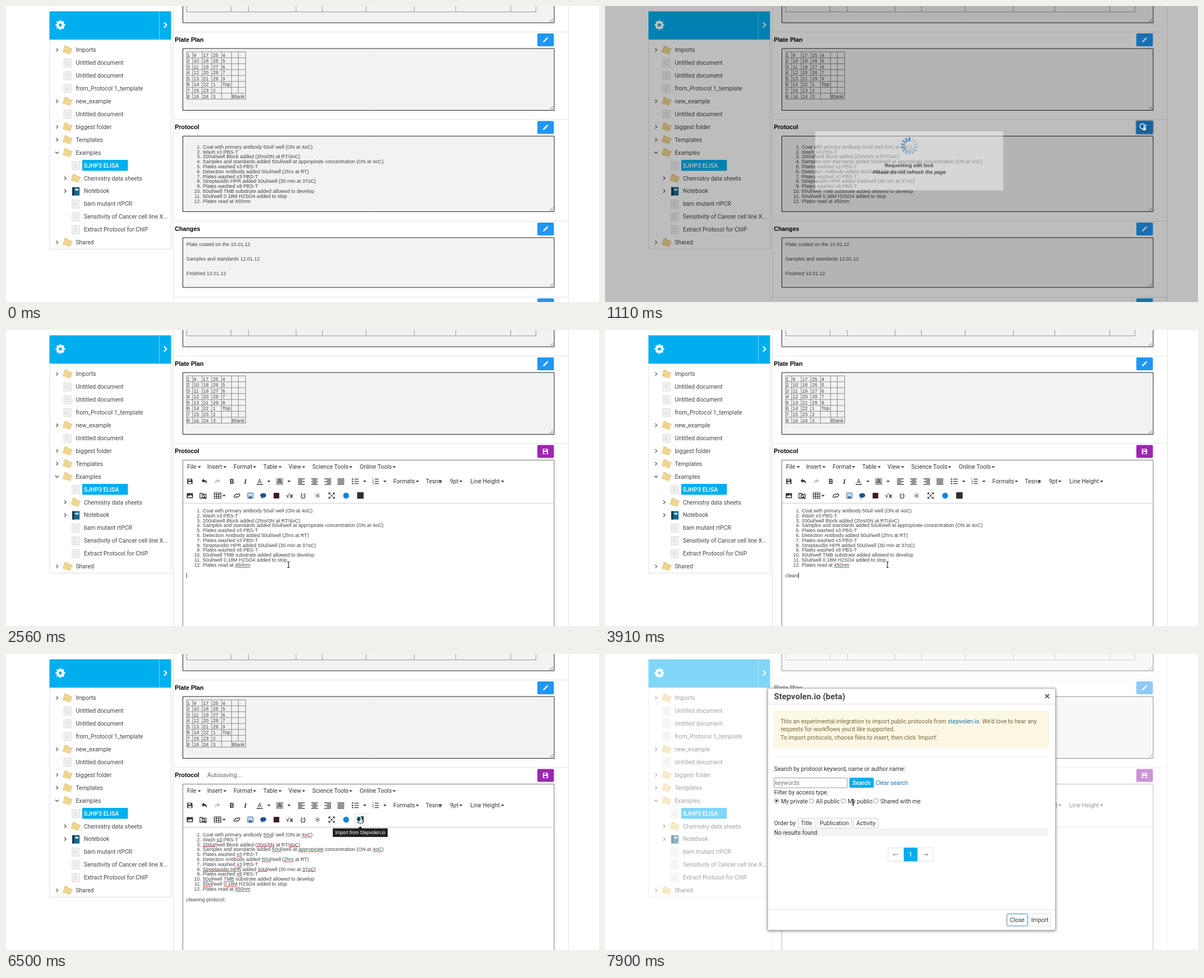
Recreate the animation shown at these times as an HTML page with a canvas. Size 1058 px wide and 529 px high, loop 7.99 s.

```html
<!DOCTYPE html>
<html lang="en">
<head>
<meta charset="utf-8">
<title>Lab notebook editing</title>
<style>
html, body { margin: 0; width: 100%; height: 100%; overflow: hidden; background: #fff; }
canvas { display: block; width: 100vw; height: 100vh; }
</style>
</head>
<body>
<canvas id="stage" width="1058" height="529"></canvas>
<script>
const c = document.getElementById('stage').getContext('2d');
const LOOP = 7990, UI = 'Roboto, sans-serif', DOC = '"Liberation Sans", sans-serif';
const BLUE = '#00aeef', INK = '#333', SITE = 'Stepvolen.io';

// ---- drawing helpers; text is centred vertically on y ----
function text(s, x, y, { size = 10.43, color = INK, style = '', face = UI, align = 'left' } = {}) {
  c.font = `${style} ${size}px ${face}`;
  c.fillStyle = color;
  c.textAlign = align;
  c.fillText(s, x, y + size * 0.36);
  return x + c.measureText(s).width;
}
const docText = (s, x, y, o) => text(s, x, y, { size: 8.94, face: DOC, color: '#444', ...o });
function box(x0, y0, x1, y1, fill, stroke, r = 0) {
  c.beginPath();
  c.roundRect(x0, y0, x1 - x0, y1 - y0, r);
  if (fill) { c.fillStyle = fill; c.fill(); }
  if (stroke) { c.strokeStyle = stroke; c.lineWidth = 1; c.stroke(); }
}
function line(x0, y0, x1, y1, color = '#ddd', w = 1) {
  c.beginPath(); c.moveTo(x0, y0); c.lineTo(x1, y1);
  c.strokeStyle = color; c.lineWidth = w; c.stroke();
}
function icon(d, x, y, { fill, stroke, w = 1.3, flip = 1 } = {}) {
  c.save();
  c.translate(x, y); c.scale(flip, 1);
  const p = new Path2D(d);
  if (fill) { c.fillStyle = fill; c.fill(p, 'evenodd'); }
  if (stroke) { c.strokeStyle = stroke; c.lineWidth = w; c.stroke(p); }
  c.restore();
}
const dot = (x, y, r, fill) => { c.beginPath(); c.arc(x, y, r, 0, 7); c.fillStyle = fill; c.fill(); };
const drop = (x, y) => icon('M-3-1.3H3L0 1.7Z', x, y, { fill: INK });

const PENCIL = 'M-4.5 4.5L-3.8 1.9 1.7-3.7 3.7-1.7-1.9 3.8ZM2.3-4.3L3.2-5.2 5.2-3.2 4.3-2.3Z';
const SAVE = 'M-4.7-4.7H3L4.7-3V4.7H-4.7ZM-2.8-3.8H1.6V-1.2H-2.8ZM-2.8 1H2.8V4H-2.8Z';
const UNDO = 'M-5-1L-1-5V-2.6C3-2.6 5 0 4 4.5 3 1.5 1 .6-1 .6V3Z';

// ---- sidebar ----
const TREE = [
  [1, 'folder', 'Imports'], [1, 'doc', 'Untitled document'], [1, 'doc', 'Untitled document'],
  [1, 'doc', 'from_Protocol 1_template'], [1, 'folder', 'new_example'], [1, 'doc', 'Untitled document'],
  [1, 'folder', 'biggest folder'], [1, 'folder', 'Templates'], [1, 'open', 'Examples'],
  [2, 'chosen', 'SJHP3 ELISA'], [2, 'folder', 'Chemistry data sheets'], [2, 'book', 'Notebook'],
  [2, 'doc', 'bam mutant rtPCR'], [2, 'doc', 'Sensitivity of Cancer cell line X...'],
  [2, 'doc', 'Extract Protocol for ChIP'], [1, 'folder', 'Shared']
];
function treeIcon(kind, x, y) {
  if (kind === 'folder' || kind === 'open') {
    icon('M-5-8L0-6.5 1-5 9-2.5 5 8-8.5 4Z', x, y, { fill: '#dfc078' });
    icon('M-5-6.5L8.5-2 4.5 8-9 3.5Z', x, y, { fill: '#efd592' });
  } else if (kind === 'book') {
    box(x - 6, y - 7, x + 7, y + 8, '#126a91');
    box(x - 6, y - 7, x - 3, y + 8, '#1d2f3a');
    box(x - 1, y - 4, x + 5, y - 1, '#d5e6ee');
  } else {
    box(x - 6.5, y - 7, x + 6.5, y + 7.5, '#f4f4f4', '#d6d6d6');
    for (const k of [-3, 0, 3]) line(x - 4, y + k, x + 3, y + k, '#d0d0d0');
  }
}
function sidebar() {
  box(78, 60, 294.5, 434.5, '#fff', '#ddd');
  box(77.5, 9.5, 294.5, 60, BLUE);
  line(273.5, 9.5, 273.5, 60, '#6fd0f5');
  c.save();
  c.translate(97, 34);
  for (let i = 0; i < 8; i++) {
    c.rotate(Math.PI / 4);
    box(-1.8, -8.4, 1.8, -4, '#fff');
  }
  c.restore();
  dot(97, 34, 6.7, '#fff');
  dot(97, 34, 2.8, BLUE);
  icon('M-2-4.5L2.5 0-2 4.5', 284, 34, { stroke: '#fff', w: 2 });
  TREE.forEach(([level, kind, label], i) => {
    const y = 78.6 + i * 22.92, dx = (level - 1) * 14.6;
    treeIcon(kind, 109.7 + dx, y);
    if (kind === 'open') icon('M-3-1.5L0 1.5 3-1.5', 91 + dx, y, { stroke: '#555' });
    else if (kind === 'folder' || kind === 'book') icon('M-1.5-3L1.5 0-1.5 3', 91 + dx, y, { stroke: '#555' });
    if (kind === 'chosen') box(136, 275, 217.5, 294.5, BLUE, null, 1.5);
    text(label, 124.4 + dx, y, kind === 'chosen' ? { color: '#fff', style: '500' } : { color: '#444' });
  });
}

// ---- document ----
const STEPS = [
  'Coat with primary antibody 50ul/ well (ON at 4oC)', 'Wash x3 PBS-T',
  '200ul/well Block added (2hrs/0N at RT/4oC)',
  'Samples and standards added 50ul/well at appropirate concentration (ON at 4oC)',
  'Plates washed x3 PBS-T', 'Detection Antibody added 50ul/well (2hrs at RT)',
  'Plates washed x3 PBS-T', 'Streptavidin HPR added 50ul/well (30 min at 37oC)',
  'Plates washed x8 PBS-T', '50ul/well TMB substrate added allowed to develop',
  '50ul/well 0.18M H2SO4 added to stop', 'Plates read at 450nm'
];
const ODD = /\b(200ul|50ul|4oC|37oC|x\d|2hrs|0N|appropirate|Streptavidin HPR|TMB|0\.18M|450nm)/g;
const ROW = 8.82;

function underline(s, x, y) {
  const base = Math.floor(y + 4.4) + .5;
  for (const m of s.matchAll(ODD)) {
    const x0 = x + c.measureText(s.slice(0, m.index)).width;
    line(x0, base, x0 + c.measureText(m[0]).width, base, '#ee5050');
  }
}
function steps(top, marked = () => false) {
  STEPS.forEach((s, i) => {
    const y = top + i * ROW;
    docText(i + 1 + '.', 348, y, { align: 'right' });
    docText(s, 351, y);
    if (marked(i)) underline(s, 351, y);
  });
}
function area(y0, y1) {
  box(315.5, y0 + .5, 978, y1 - .5, '#f3f2f3', '#222');
  line(970, y1 - 2, 976, y1 - 8, '#777');
  line(973.5, y1 - 2, 976, y1 - 4.5, '#777');
}
function section(title, y) {
  line(299, y - 13.5, 1003, y - 13.5, '#e2e2e2');
  text(title, 301.3, y, { size: 10.73, style: 'bold', face: DOC, color: '#000' });
}
function button(y, color = '#2196f3', shape = PENCIL) {
  box(948, y - 11.5, 977.5, y + 11.5, color, null, 2);
  icon(shape, 962.5, y, { fill: '#fff' });
}
function plateTable() {
  const xs = [322.5, 333, 350, 367, 384.5, 402.5, 414.5, 427.5], h = 10.55;
  for (let r = 0; r <= 8; r++) line(322, 82 + r * h, 428, 82 + r * h, '#888');
  xs.forEach((x, i) => line(x, 82, x, 82 + h * (i === 6 ? 7 : 8), '#888'));
  const last = ['4', '5', '6', '7', '9', 'Top', '', ''];
  for (let r = 0; r < 8; r++) {
    const y = 87.5 + r * h;
    [r + 1, r + 9, r + 17, r < 5 ? r + 25 : r - 4, last[r]].forEach((v, i) =>
      docText(String(v), [323, 334.5, 351.5, 369, 386][i], y));
  }
  docText('Blank', 403.2, 87.5 + 7 * h);
}
function page(t) {
  box(0, 0, 1058, 529, '#fff');
  line(298.5, 0, 298.5, 529, '#e2e2e2');
  line(1003.5, 0, 1003.5, 529, '#e2e2e2');
  sidebar();
  area(-20, 30.5);
  line(322, 10.5, 946, 10.5, '#999');
  for (const x of [322, 401, 432, 517, 564, 642, 728, 802, 900, 945]) line(x + .5, 0, x + .5, 10.5, '#999');
  section('Plate Plan', 60);
  button(60.5);
  area(75.5, 187);
  plateTable();
  section('Protocol', 216.3);
  if (t >= 1170) return editor(t);
  const hover = t >= 690;
  if (hover) box(946.5, 204, 979, 230, '#a9b4bd', null, 3);
  button(217, hover ? '#1c86dc' : undefined);
  area(232, 368);
  steps(251.5);
  section('Changes', 398);
  button(398.5);
  area(413.5, 503.5);
  ['Plate coated on the 10.01.12', 'Samples and standards 12.01.12', 'Finished 13.01.12']
    .forEach((s, i) => docText(s, 321.7, 426 + i * 25.7));
  line(299, 520.5, 1003, 520.5, '#e2e2e2');
  button(534);
}

// ---- editor ----
const TYPED = 'cleaning protocol: ';
const KEYS = [3360, 3510, 3590, 3660, 3740, 3910, 4060, 4140, 4220, 4300, 4370, 4450, 4530,
  4680, 4770, 4920, 5090, 5320, 5470];

function toolbar(t) {
  [['File', 323, 345], ['Insert', 359, 390.5], ['Format', 406, 443.5], ['Table', 459, 489], ['View', 504, 531],
   ['Science Tools', 546.5, 615], ['Online Tools', 631, 692.5]].forEach(([s, x, d]) => { text(s, x, 244.5); drop(d, 244.8); });
  const y = 270.5, z = 296;
  if (t >= 1690 && t < 2560) box(652, 260, 682, 281, '#dbdbdb');
  icon(SAVE, 328, y, { fill: INK });
  icon(UNDO, 354, y, { fill: t < 2330 ? '#bbb' : INK });
  icon(UNDO, 377, y, { fill: '#c4c4c4', flip: -1 });
  text('B', 403, y, { size: 12.5, style: 'bold', align: 'center' });
  text('I', 427, y, { size: 12.5, style: 'italic bold', face: '"Liberation Serif", serif', align: 'center' });
  text('A', 452.5, y, { size: 11, align: 'center' });
  line(447, 276, 458, 276, INK, 1.5);
  box(482, 264.5, 494.5, 277, '#aaa');
  text('A', 488.3, y, { size: 11, align: 'center' });
  [469, 505, 640, 676].forEach(x => drop(x, y));
  [527, 550.5, 574, 597.5].forEach((x, k) => {
    for (let i = 0; i < 5; i++) {
      const w = k < 3 && i % 2 ? 7.5 : 12, off = [0, (12 - w) / 2, 12 - w, 0][k];
      line(x - 6 + off, y - 4.5 + i * 2.5, x - 6 + off + w, y - 4.5 + i * 2.5, INK, 1.3);
    }
  });
  for (let i = -1; i <= 1; i++) {
    box(617, y + i * 4 - 1, 619.5, y + i * 4 + 1, INK);
    line(621.5, y + i * 4, 629, y + i * 4, INK, 1.3);
    text(String(i + 2), 653.5, y + i * 4, { size: 4.5 });
    line(658, y + i * 4, 665, y + i * 4, INK, 1.3);
  }
  [['Formats', 691, 734], ['Tesno', 749, 775], ['9pt', 792, 811.5], ['Line Height', 828.5, 886]]
    .forEach(([s, x, d]) => { text(s, x, y); drop(d, y); });

  icon('M-5.5-4.5H5.5V4.5H-5.5ZM-4.5 3L-1.5-1 0 1 2-2 4.5 3Z', 328, z, { fill: INK });
  icon('M-6-4H-2L-1-2.7H5V4.5H-6Z', 352, z, { stroke: INK });
  c.beginPath(); c.arc(352, 297, 2.3, 0, 7); c.stroke();
  line(353, 298, 357, 302, INK, 1.6);
  icon('M-6-5H6V5H-6ZM-6-2H6M-6 1.5H6M-2-5V5M2-5V5', 377.5, z, { stroke: INK, w: 1.1 });
  drop(389, z);
  icon('M-1 1.5L-2.5 3.2A2 2 0 0 1-5 .5L-2-2.4A2 2 0 0 1 .8-1.5M1-1.5L2.5-3.2A2 2 0 0 1 5-.5L2 2.4A2 2 0 0 1-.8 1.5', 412, z, { stroke: INK });
  box(431, 291, 441, 301, '#c6dcee', '#3d6f9c', 1);
  box(433, 297.5, 439, 300.5, '#315d85');
  icon('M0-4.5C7-4.5 7 3.5 0 3.5L-3.5 5.5-3 2.8C-7.5 1-5.5-4.5 0-4.5Z', 459, z, { fill: '#1c5496' });
  box(477.5, 291, 487.5, 301, '#3a1a20');
  text('√x', 506, z, { size: 10, style: 'bold', align: 'center', face: 'DejaVu Sans, sans-serif' });
  text('{;}', 530, z, { size: 10, style: 'bold', align: 'center' });
  icon('M-5-2L4 2M-4 3L4-3M-1-5L1 5', 556, z, { stroke: '#777', w: 1.1 });
  for (const [dx, dy] of [[1, 1], [1, -1], [-1, 1], [-1, -1]]) {
    line(581, z, 581 + dx * 4, z + dy * 4, INK);
    icon(`M${dx * 5.5} ${dy * 5.5}V${dy * 1.5}L${dx * 1.5} ${dy * 5.5}Z`, 581, z, { fill: INK });
  }
  dot(606.8, z, 5.2, '#1081de');
  if (t >= 6420 && t < 7030) box(622.5, 285.5, 642.5, 306.5, '#fff', '#ddd');
  box(626.5, 290, 638, 301.5, '#2b2f31');
}
function editor(t) {
  button(217, '#9c27b0', SAVE);
  box(315.5, 232.5, 978, 540, '#fff', '#777');
  line(316, 309.5, 978, 309.5, '#ccc');
  toolbar(t);
  steps(322.7, i => t >= 6260 || (i === 11 && t >= 1860));
  const n = KEYS.filter(k => t >= k).length, para = 438.7;
  const end = docText(TYPED.slice(0, n), 321.7, para);
  const extra = 322.7 + 12 * ROW;
  if (t >= 2330 && t < 2560) docText('13.', 348, extra, { align: 'right' });
  if (t >= 1690 && t < 5870) {
    const [x, y] = t < 2330 ? [437, 419.7] : t < 2560 ? [351, extra] : [end + .5, para];
    line(x, y - 4.7, x, y + 4.7, '#222', .9);
  }
  if (t >= 6420) text('Autosaving...', 359, 216.3, { size: 10.73, face: DOC, color: '#666' });
  if (t >= 6500 && t < 6730) {
    icon('M-4 3L0-1 4 3Z', 632, 309, { fill: '#222' });
    box(583, 311.5, 681, 327, '#222');
    text('Import from ' + SITE, 632, 319.3, { size: 8.2, face: DOC, color: '#fff', align: 'center' });
  }
}

// ---- lock notice ----
function lockNotice(t) {
  const full = t >= 1020;
  box(0, 0, 1058, 529, `rgba(0,0,0,${full ? .26 : .13})`);
  c.save();
  c.globalAlpha = full ? 1 : .5;
  box(375, 224, 710.5, 329.5, 'rgba(255,255,255,.45)');
  c.translate(543, 250);
  for (let i = 0; i < 14; i++) {
    c.rotate(Math.PI / 7);
    line(0, -8, 0, -15.5, `rgba(60,125,175,${.12 + i * .055})`, 3.2);
  }
  c.restore();
  const o = { size: 8.94, face: DOC, align: 'center', color: '#4a4a4a' };
  text('Requesting edit lock', 542.5, 284.3, { ...o, style: 'bold' });
  text('Please do not refresh the page', 543, 296.5, { ...o, style: 'italic bold' });
}

// ---- import dialog ----
const FADE = [[7030, .15], [7120, .4], [7200, .63], [7350, .88], [7430, 1]];
// The shadow falls only outside the box, so the page shows clean through it while fading.
function dialogShadow() {
  c.save();
  c.beginPath();
  c.rect(0, 0, 1058, 529);
  c.rect(290, 61, 514, 433);
  c.clip('evenodd');
  c.shadowColor = 'rgba(0,0,0,.5)'; c.shadowBlur = 5; c.shadowOffsetY = 1;
  box(290, 61, 804, 494, '#fff');
  c.restore();
}
function dialog(t) {
  const p = FADE.filter(k => t >= k[0]).pop()[1];
  box(0, 0, 1058, 529, `rgba(255,255,255,${.5 * p})`);
  c.save();
  c.globalAlpha = p;
  dialogShadow();
  box(290, 61, 804, 494, '#fff');
  box(290.5, 61.5, 803.5, 493.5, null, '#bbb');
  line(291, 89.5, 803, 89.5);
  line(291, 457, 803, 457);
  text(SITE + ' (beta)', 301.5, 75.5, { size: 14.9, style: 'bold', color: '#444' });
  icon('M-3.5-3.5L3.5 3.5M3.5-3.5L-3.5 3.5', 789, 75.5, { stroke: '#333', w: 1.5 });
  box(717, 464.5, 753.5, 486, '#fff', '#3d82b8', 1);
  text('Close', 735.3, 475, { align: 'center' });
  box(756.5, 464.5, 795.5, 486, '#fff', '#ddd', 1);
  text('Import', 776, 475, { align: 'center' });
  if (t >= 7660) search();
  c.restore();
}
function search() {
  const note = { color: '#776740' }, link = { color: '#176fb5' };
  box(302, 101.5, 791.5, 167.5, '#fcf8e3', '#f7efd5', 1);
  let x = text('This an experimental integration to import public protocols from ', 313.3, 120, note);
  x = text(SITE.toLowerCase(), x, 120, link);
  text(". We'd love to hear any", x, 120, note);
  text("requests for workflows you'd like supported.", 313.3, 134.5, note);
  text("To import protocols, choose files to insert, then click 'Import'.", 313.3, 149.3, note);
  line(302, 183.5, 791, 183.5, '#f5f5f5');
  text('Search by protocol keyword, name or author name:', 301.7, 205.7);
  box(301.5, 221.5, 432, 239, '#fff', '#999');
  text('keywords', 303, 230, { color: '#777' });
  box(436, 221, 479.5, 239, BLUE, null, 2);
  text('Search', 457.7, 230, { color: '#fff', style: '500', align: 'center' });
  text('Clear search', 482.7, 230, link);
  text('Filter by access type.', 301.7, 247);
  [['My private', 306, 314], ['All public', 368.5, 376.3], ['My public', 425, 433], ['Shared with me', 483.5, 491.3]]
    .forEach(([s, rx, tx], i) => {
      c.beginPath(); c.arc(rx, 262.5, 4, 0, 7);
      c.strokeStyle = '#888'; c.lineWidth = .9; c.stroke();
      if (!i) dot(rx, 262.5, 2.1, '#444');
      text(s, tx, 263.5);
    });
  text('Order by', 301.7, 302);
  [['Title', 344.5, 374.5], ['Publication', 378.5, 439.5], ['Activity', 443.5, 487.5]].forEach(([s, a, b]) => {
    box(a, 293.5, b, 311, '#fff', '#ccc', 2);
    text(s, (a + b) / 2, 302, { align: 'center' });
  });
  box(302, 312, 791.5, 326, '#f4f4f4');
  text('No results found', 301.7, 319.3);
  box(505, 346.5, 586, 370.5, '#fff', '#ddd', 2);
  box(533, 346, 557.5, 370.5, BLUE);
  text('1', 545.3, 358, { color: '#fff', style: '500', align: 'center' });
  for (const k of [-1, 1]) icon('M-4.5 0H4.5M2-2.3L4.5 0 2 2.3', 545.3 + k * 26.5, 358.5, { stroke: '#777', w: .9, flip: k });
}

// ---- pointer: start, end, number of steps, destination ----
const MOVES = [
  [150, 690, 8, 961, 214], [1170, 1170, 1, 444, 406], [1310, 1540, 4, 499, 431],
  [1690, 1860, 3, 504, 419.5], [5870, 6420, 8, 632, 294], [7660, 7900, 4, 442.5, 265]
];
function pointerAt(t) {
  let x = 956, y = 446;
  for (const [t0, t1, n, tx, ty] of MOVES) {
    if (t < t0) break;
    const k = t >= t1 ? 1 : (Math.floor((t - t0) * (n - 1) / (t1 - t0) + .01) + 1) / n;
    const e = k * k * (3 - 2 * k);
    x += (tx - x) * e;
    y += (ty - y) * e;
  }
  return [x, y];
}
function pointer(t) {
  if (t < 150) return;
  const [x, y] = pointerAt(t);
  const beam = (t >= 1170 && t < 7030 && y > 312) || t >= 7820;
  const hand = (t >= 690 && t < 1170) || (t >= 6420 && t < 7030);
  if (beam) icon('M-2-5H-.5L0-4.5 .5-5H2M0-4.5V4.5M-2 5H-.5L0 4.5 .5 5H2', x, y, { stroke: '#111', w: 1.1 });
  else if (hand) {
    icon('M-1-2.5Q0-3.5 1-2.5V1.5L5 2.5V6L3.5 9H-1.5L-4 5-3.5 3.5-1 5Z', x, y, { fill: '#fff', stroke: '#111', w: .9 });
    if (t >= 930) {
      c.beginPath(); c.arc(x - 2, y + 1, 4.5, 0, 7);
      c.strokeStyle = '#9adcf5'; c.lineWidth = 2; c.stroke();
    }
  } else icon('M0 0V9.5L2.2 7.4 3.8 11 5.3 10.3 3.7 6.8H6.8Z', x, y, { fill: '#fff', stroke: '#111', w: .9 });
}

function draw(now) {
  const t = now % LOOP;
  page(t);
  if (t >= 930 && t < 1170) lockNotice(t);
  if (t >= 7030) dialog(t);
  pointer(t);
}
const start = performance.now();
function tick() {
  draw(performance.now() - start);
  requestAnimationFrame(tick);
}
tick();
</script>
</body>
</html>
```
